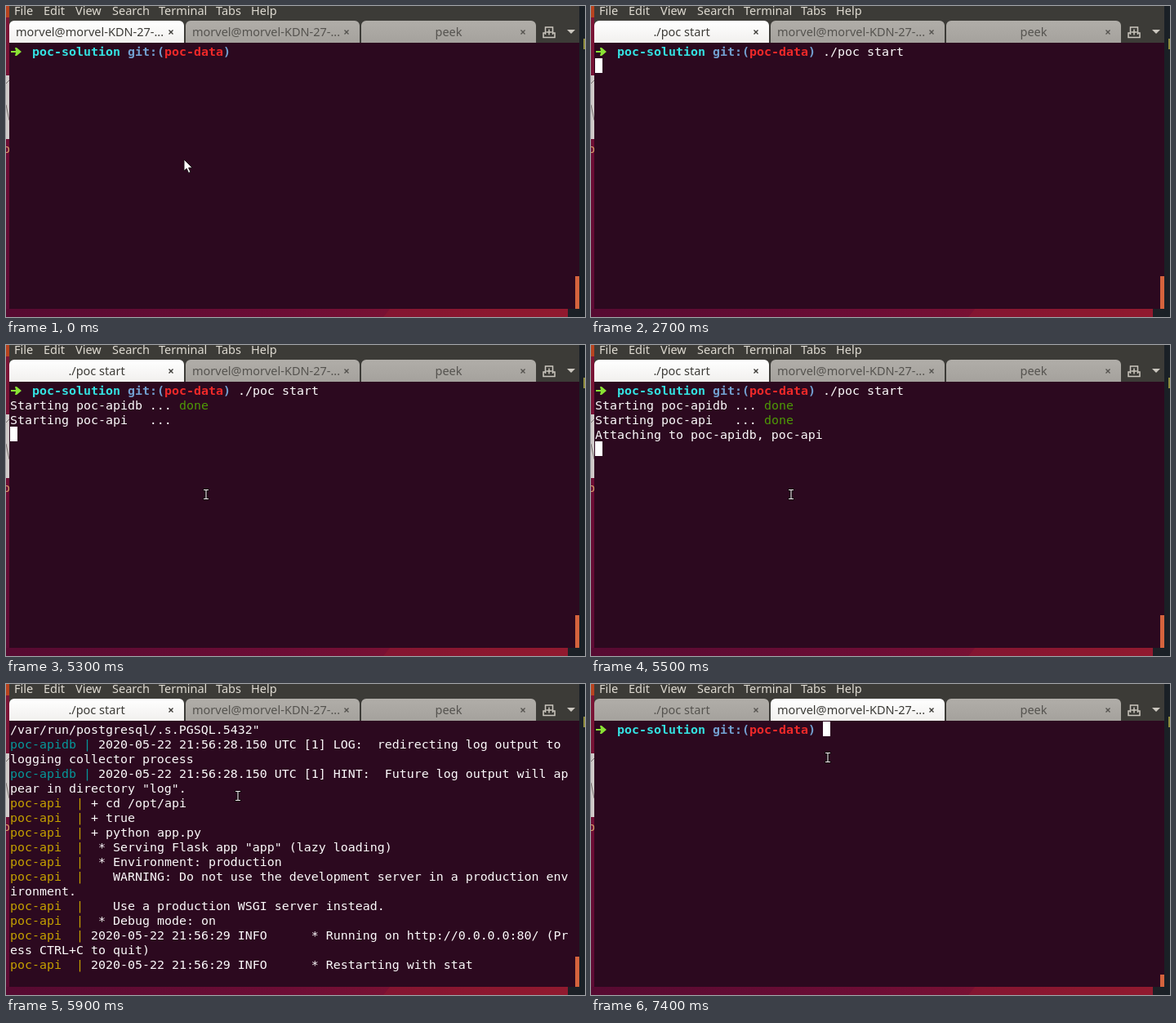
An HTML page with a canvas that plays this animation: 709 by 381 pixels, repeating every 8 s.

```html
<!DOCTYPE html>
<html lang="en">
<head>
<meta charset="utf-8">
<title>Terminal session</title>
<style>
html, body { margin: 0; width: 100%; height: 100%; overflow: hidden; background: #2c091f; }
canvas { display: block; }
</style>
</head>
<body>
<canvas id="stage" width="709" height="381"></canvas>
<script>
const ctx = document.getElementById('stage').getContext('2d');
const LOOP = 8000, STEP = 100;
const COLS = 76, ROWS = 18, CELL_W = 9, CELL_H = 18, LEFT = 5, TOP = 46;
const MONO = '14.95px "DejaVu Sans Mono", monospace';
const SANS = '14.5px "Noto Sans", sans-serif';
const WHITE = '#fcfafb', GREEN = '#4e9a06', TEAL = '#06989a', YELLOW = '#c4a000';
const HOST = 'morvel@morvel-KDN-27-...';

// A line is a list of [text, colour, bold] runs.
const prompt = [
  ['➜', '#8ae234', true], ['  ', WHITE], ['poc-solution ', '#34e2e2', true],
  ['git:(', '#729fcf', true], ['poc-data', '#ef2929', true], [')', '#729fcf', true], [' ', WHITE]
];
const plain = text => [[text, WHITE]];
const db = text => [['poc-apidb |', TEAL], [' 2020-05-22 21:56:28.' + text, WHITE]];
const api = text => [['poc-api  |', YELLOW], [' ' + text, WHITE]];
const stamped = (level, text) => api('2020-05-22 21:56:29 ' + level.padEnd(10) + '* ' + text);
const starting = (name, done) => [['Starting ' + name.padEnd(9) + ' ... ', WHITE], [done ? 'done' : '', GREEN]];

const serverLog = [
  db('142 UTC [1] LOG:  listening on Unix socket "/var/run/postgresql/.s.PGSQL.5432"'),
  db('150 UTC [1] LOG:  redirecting log output to logging collector process'),
  db('150 UTC [1] HINT:  Future log output will appear in directory "log".'),
  api('+ cd /opt/api'),
  api('+ true'),
  api('+ python app.py'),
  api(' * Serving Flask app "app" (lazy loading)'),
  api(' * Environment: production'),
  api('   WARNING: Do not use the development server in a production environment.'),
  api('   Use a production WSGI server instead.'),
  api(' * Debug mode: on'),
  stamped('INFO', 'Running on http://0.0.0.0:80/ (Press CTRL+C to quit)'),
  stamped('INFO', 'Restarting with stat')
];
const debuggerLog = [
  stamped('WARNING', 'Debugger is active!'),
  stamped('INFO', 'Debugger PIN: 983-340-460')
];

// [time, characters typed so far]
const typing = [[0, 0], [800, 1], [1000, 2], [1500, 3], [1600, 5], [1800, 6], [2000, 7], [2200, 9], [2400, 11]];
const blinkOff = [[0, 400], [3200, 3800], [4400, 5300], [5900, 6300]];
// [time, x, y, shape]; positions are interpolated while the next shape is the same
const pointer = [
  [0, 218, 188, 'arrow'], [500, 0, 0, ''], [3900, 224, 189, 'beam'], [4400, 245, 183, 'beam'],
  [5600, 245, 183, 'beam'], [6300, 335, 75, 'beam'], [6400, 312, 48, 'beam'], [6500, 291, 34, 'arrow'],
  [6600, 301, 30, 'arrow'], [7000, 301, 30, 'arrow'], [7100, 295, 62, 'beam'],
  [7200, 291, 80, 'beam'], [7300, 291, 80, 'beam'], [7400, 290, 90, 'beam']
];

const latest = (keys, t) => keys.filter(k => k[0] <= t).pop();

function rect(x, y, w, h, fill) {
  ctx.fillStyle = fill;
  ctx.fillRect(x, y, w, h);
}

function poly(points, fill, stroke) {
  ctx.beginPath();
  points.forEach(([x, y]) => ctx.lineTo(x, y));
  ctx.closePath();
  if (fill) { ctx.fillStyle = fill; ctx.fill(); }
  if (stroke) { ctx.strokeStyle = stroke; ctx.lineWidth = 1; ctx.stroke(); }
}

function label(text, x, y, fill, align = 'left') {
  ctx.font = SANS;
  ctx.textAlign = align;
  ctx.fillStyle = fill;
  ctx.fillText(text, x, y);
}

function gradient(x0, y0, x1, y1, ...colors) {
  const g = ctx.createLinearGradient(x0, y0, x1, y1);
  colors.forEach((c, i) => g.addColorStop(i / (colors.length - 1), c));
  return g;
}

function drawDesktop() {
  rect(0, 0, 709, 381, gradient(0, 0, 0, 381, '#7d1636', '#6c0c34', '#5c0b34'));
  rect(0, 0, 4, 14, '#b8431f');
  rect(0, 85, 4, 78, '#cfcac9');
  ctx.strokeStyle = '#77706f';
  ctx.lineWidth = 1;
  ctx.beginPath();
  ctx.moveTo(0, 95); ctx.lineTo(4, 91);
  ctx.moveTo(0, 121); ctx.lineTo(4, 140);
  ctx.stroke();
  label('p', -4, 180, '#d9a06a');
  rect(0, 371, 688, 10, gradient(0, 0, 688, 0, '#560a31', '#6d0d35', '#8b1830'));
  poly([[462, 381], [470, 371], [688, 371], [688, 381]], 'rgba(160,30,45,.3)');
  rect(688, 371, 21, 10, '#1b2026');
  rect(702, 0, 7, 381, '#1a2026');
  rect(707, 40, 2, 13, '#8d8a3c');
}

function drawTab(x, w, title, active) {
  ctx.beginPath();
  ctx.roundRect(x, 18, w, 27, [6, 6, 0, 0]);
  ctx.fillStyle = active ? gradient(0, 18, 0, 45, '#ffffff', '#f1f0ee') : gradient(0, 18, 0, 45, '#b0ada8', '#a5a29d');
  ctx.fill();
  const ink = active ? '#3c3b37' : '#55534f';
  if (title === HOST) label(title, x + 8, 37, ink);
  else label(title, x + w / 2, 37, ink, 'center');
  const cx = x + w - 16, cy = 32;
  ctx.strokeStyle = ink;
  ctx.lineWidth = 1.4;
  ctx.beginPath();
  ctx.moveTo(cx - 2.5, cy - 2.5); ctx.lineTo(cx + 2.5, cy + 2.5);
  ctx.moveTo(cx + 2.5, cy - 2.5); ctx.lineTo(cx - 2.5, cy + 2.5);
  ctx.stroke();
}

function drawWindow(t) {
  const second = t >= 6900;
  rect(4, 0, 698, 45, '#3c3b37');
  [['File', 10], ['Edit', 46], ['View', 85], ['Search', 130], ['Terminal', 187], ['Tabs', 257], ['Help', 300]]
    .forEach(([text, x]) => label(text, x, 11, '#dfdbd2'));
  drawTab(4, 214, t < 2700 ? HOST : './poc start', !second);
  drawTab(220, 213, HOST, second);
  drawTab(435, 214, 'peek', false);

  ctx.strokeStyle = '#cbc7bf';
  ctx.lineWidth = 1.5;
  ctx.beginPath();
  ctx.moveTo(660, 33); ctx.lineTo(658, 33); ctx.lineTo(658, 38.5); ctx.lineTo(672, 38.5);
  ctx.lineTo(672, 33); ctx.lineTo(670, 33);
  ctx.moveTo(660.5, 35); ctx.lineTo(660.5, 26); ctx.lineTo(669.5, 26); ctx.lineTo(669.5, 35);
  ctx.moveTo(665, 28.5); ctx.lineTo(665, 35.5);
  ctx.moveTo(661.5, 32); ctx.lineTo(668.5, 32);
  ctx.stroke();
  poly([[687, 29], [697, 29], [692, 34]], '#cbc7bf');

  rect(4, 45, 698, 326, '#2c091f');
  const thumb = second ? 356 : t >= 5600 ? 334 : 331;
  rect(697, thumb, 5, 371 - thumb, '#d4633d');
}

function screenLines(t) {
  if (t >= 6900) return [prompt];
  const command = './poc start'.slice(0, latest(typing, t)[1]);
  const lines = [[...prompt, [command, WHITE]]];
  if (t < 2700) return lines;
  if (t >= 3200) lines.push(starting('poc-apidb', t >= 4100));
  if (t >= 4100) lines.push(starting('poc-api', t >= 5500));
  if (t >= 5500) lines.push(plain('Attaching to poc-apidb, poc-api'));
  if (t >= 5600) lines.push(...serverLog);
  if (t >= 6100) lines.push(...debuggerLog);
  lines.push([]);
  return lines;
}

function wrap(line) {
  const rows = [[]];
  let col = 0;
  for (const [run, color, bold] of line) {
    let text = run;
    while (text) {
      if (col === COLS) { rows.push([]); col = 0; }
      const part = text.slice(0, COLS - col);
      rows[rows.length - 1].push({ text: part, col, color, bold });
      col += part.length;
      text = text.slice(part.length);
    }
  }
  return rows;
}

function drawRun(run, y) {
  const x = LEFT + run.col * CELL_W;
  if (run.text === '➜') {
    poly([[6, y + 9], [12, y + 9], [11, y + 5], [13, y + 5], [19, y + 10],
      [13, y + 15], [11, y + 15], [12, y + 11], [6, y + 11]], run.color);
    return;
  }
  ctx.font = (run.bold ? 'bold ' : '') + MONO;
  ctx.textAlign = 'left';
  ctx.fillStyle = run.color;
  ctx.fillText(run.text, x, y + 15);
}

function drawTerminal(t) {
  const rows = screenLines(t).flatMap(wrap).slice(-ROWS);
  rows.forEach((row, i) => row.forEach(run => drawRun(run, TOP + i * CELL_H)));
  if (blinkOff.some(([from, to]) => t >= from && t < to)) return;
  const end = rows[rows.length - 1].reduce((n, run) => n + run.text.length, 0);
  rect(LEFT + end * CELL_W, TOP + (rows.length - 1) * CELL_H, CELL_W, CELL_H, '#ffffff');
}

function drawPointer(t) {
  const now = latest(pointer, t), next = pointer[pointer.indexOf(now) + 1];
  let [t0, x, y, shape] = now;
  if (next && next[3] === shape) {
    const k = (t - t0) / (next[0] - t0);
    x += (next[1] - x) * k;
    y += (next[2] - y) * k;
  }
  ctx.save();
  ctx.translate(Math.round(x), Math.round(y));
  if (shape === 'arrow') {
    poly([[0, 0], [0, 14], [3.2, 11.2], [5.6, 16.5], [8, 15.4], [5.6, 10.3], [10, 10]], '#ffffff', '#1c1418');
  } else if (shape === 'beam') {
    rect(-4, -7, 8, 3, '#16060f');
    rect(-4, 4, 8, 3, '#16060f');
    rect(-2, -7, 4, 14, '#16060f');
    rect(-3, -6, 6, 1, '#e8e4e6');
    rect(-3, 5, 6, 1, '#e8e4e6');
    rect(-0.5, -6, 1, 12, '#ffffff');
  }
  ctx.restore();
}

function frame(now) {
  const t = Math.floor((now % LOOP) / STEP) * STEP;
  drawDesktop();
  drawWindow(t);
  drawTerminal(t);
  drawPointer(t);
  requestAnimationFrame(frame);
}

const start = performance.now();
frame(0);
function tick() { return performance.now() - start; }
</script>
</body>
</html>
```
